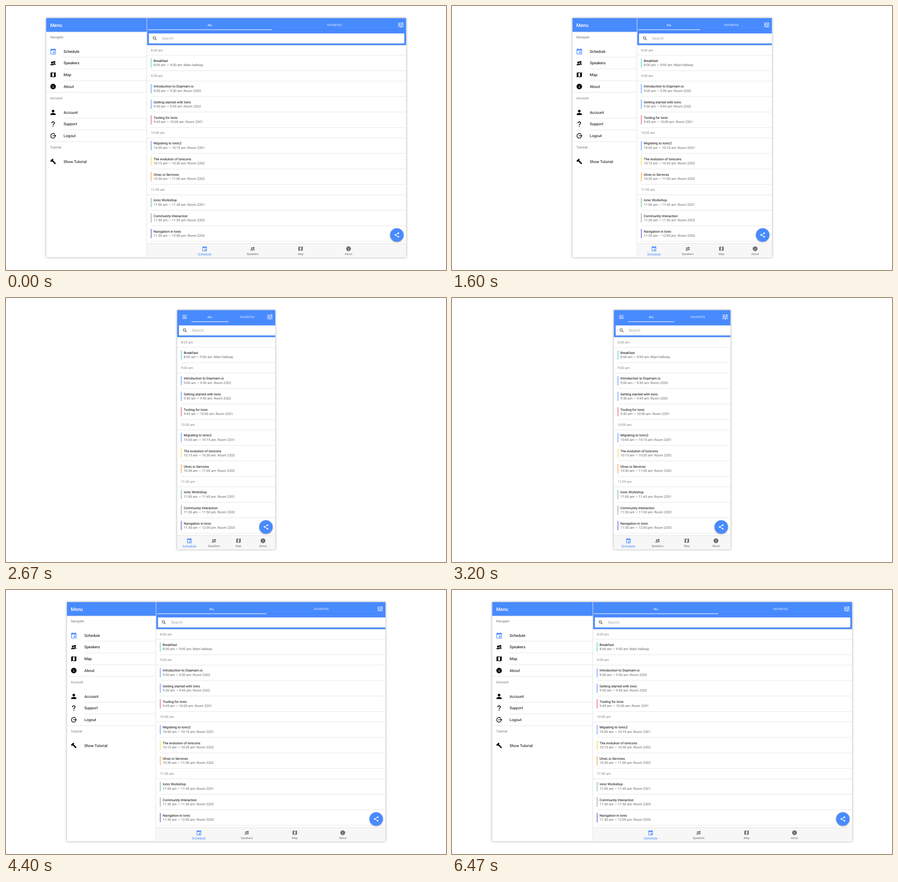
Animation of 966 by 580 pixels, one loop 6530 ms. Source, as an HTML page:

```html
<!DOCTYPE html>
<html lang="en">
<head>
<meta charset="utf-8">
<title>Responsive schedule</title>
<style>
  html, body { margin: 0; width: 100%; height: 100%; overflow: hidden; background: #fff; }
  #stage { display: block; width: 966px; height: 580px; }
  text { font-family: Roboto, sans-serif; text-rendering: geometricPrecision; white-space: pre; }
  .mid { text-anchor: middle; }
  .rule { stroke: #dedede; stroke-width: .8; }
  .blue { fill: #488aff; color: #488aff; }
  .line { fill: none; stroke: currentColor; }
  #frame { fill: #fff; filter: drop-shadow(0 .5px 2px rgba(0, 0, 0, .42)); }
  #fab { filter: drop-shadow(0 1px 1.6px rgba(0, 0, 0, .4)); }
  #field { width: calc(100% - 8.2px); filter: drop-shadow(0 .6px .6px rgba(0, 0, 0, .25)); }
</style>
</head>
<body>
<svg id="stage" viewBox="0 0 966 580"></svg>
<script>
const BLUE = '#488aff';
const TOP = 26.6, BOTTOM = 552.4, CENTER = 483.4;
const LOOP = 6530, STEP = 1000 / 15;
const SPLIT_MIN = 404, MENU_MIN = 142.2, TAB_MAX = 105.3;

// Icons on a 24-unit grid, centred on 12,12
const icons = {
  calendar: '<path fill-rule="evenodd" d="M16 2v2H8V2H6v2H5a2 2 0 0 0-2 2v14a2 2 0 0 0 2 2h14a2 2 0 0 0 2-2V6a2 2 0 0 0-2-2h-1V2zM5 9h14v11H5zM12 13h5v5h-5z"/>',
  people: '<circle cx="16.4" cy="8" r="4.3"/><path d="M11 18c1-4 3-5 5.500-5s6.500 2 6.500 5z"/>' +
    '<g stroke="#fff" stroke-width="1.100"><circle cx="8.200" cy="9.700" r="4.600"/><path d="M.3 20.500c0-4 4.500-6 8-6s8 2 8 6z"/></g>',
  map: '<path fill-rule="evenodd" d="M21 3l-6 2.100L9 3 3 5v16l6-2.100 6 2.100 6-2zM15 19l-6-2.100V5l6 2.100z"/>',
  info: '<path fill-rule="evenodd" d="M12 2a10 10 0 0 0 0 20 10 10 0 0 0 0-20zM11 7h2v2h-2zM11 11h2v6h-2z"/>',
  person: '<circle cx="12" cy="8" r="4"/><path d="M12 14c-2.700 0-8 1.300-8 4v2h16v-2c0-2.700-5.300-4-8-4z"/>',
  help: '<path class="line" stroke-width="2.800" d="M7 8.500C7 1.500 17 1.500 17 8c0 3.500-5 4-5 8"/><path d="M10.500 18.500h3v3h-3z"/>',
  logout: '<path class="line" stroke-width="2.200" d="M18.500 6.500a8.500 8.500 0 1 0 0 11M9 12h12M17.500 8.200L21.300 12l-3.800 3.800"/>',
  hammer: '<path d="M2 9.500L9.500 2 14 3.500 11.500 6l1.500 3 9 9.500-3 3-9.500-9-3-1L4.500 13z"/>',
  search: '<circle class="line" stroke-width="2.300" cx="9.500" cy="9.500" r="5.500"/><path class="line" stroke-width="2.500" d="M13.800 13.800l6 6"/>',
  share: '<path class="line" stroke-width="2" d="M18 5L6 12l12 7"/><circle cx="18" cy="5" r="3"/><circle cx="6" cy="12" r="3"/><circle cx="18" cy="19" r="3"/>',
  options: '<path class="line" stroke-width="2" d="M3 6h10M17 6h4M16 3v6M3 12h5M11 12h10M8 9v6M3 18h6M13 18h8M12 15v6"/>',
};

const icon = (name, x, y, scale, color = '#000') =>
  `<g fill="${color}" color="${color}" transform="translate(${x} ${y}) scale(${scale}) translate(-12 -12)">${icons[name]}</g>`;
const text = (str, x, y, size, color = '#000', extra = '') =>
  `<text x="${x}" y="${y + size * .36}" font-size="${size}" fill="${color}" ${extra}>${str}</text>`;
const rule = (x, y) => `<line class="rule" x1="${x}" x2="100%" y1="${y}" y2="${y}"/>`;
const bar = (y, height) => `<rect class="blue" y="${y}" width="100%" height="${height}"/>`;
const shade = y => `<rect y="${y}" width="100%" height="1" fill="#000" opacity=".15"/>`;

const SMALL = 6.32, BODY = 7.37, LABEL = 8.42, TITLE = 10.53;

function menuMarkup() {
  const groups = [
    ['Navigate', 68.6, [['calendar', 'Schedule', .65], ['people', 'Speakers', .56], ['map', 'Map', .63], ['info', 'About', .61]]],
    ['Account', 202.6, [['person', 'Account', .71], ['help', 'Support', .58], ['logout', 'Logout', .61]]],
    ['Tutorial', 310.7, [['hammer', 'Show Tutorial', .62]]],
  ];
  let out = bar(TOP, 30) + shade(56.6) + text('Menu', 8.7, 41.8, TITLE, '#fff', 'font-weight="500"');
  for (const [name, top, items] of groups) {
    out += text(name, 8.7, top, BODY, '#757575');
    items.forEach(([glyph, label, scale], i) => {
      const y = top + 31.1 + i * 25.75;
      const last = i === items.length - 1;
      out += icon(glyph, 15.2, y, scale, label === 'Schedule' ? BLUE : '#000') + text(label, 38.3, y, LABEL);
      if (name !== 'Tutorial') out += rule(last ? 0 : 38.3, y + 12.7);
    });
  }
  return out + `<rect x="100%" y="${TOP}" width="1" height="526" fill="#d4d4d4" transform="translate(-.9)"/>`;
}

function listMarkup() {
  const groups = [
    ['8:00 am', [['Breakfast', '8:00 am — 9:00 am: Main hallway', '#3bcfcb']]],
    ['9:00 am', [
      ['Introduction to Dopmarn.io', '9:00 am — 9:30 am: Room 2203', BLUE],
      ['Getting started with Ionic', '9:30 am — 9:45 am: Room 2202', BLUE],
      ['Tooling for Ionic', '9:45 am — 10:00 am: Room 2201', '#ee4b50']]],
    ['10:00 am', [
      ['Migrating to Ionic2', '10:00 am — 10:15 am: Room 2201', BLUE],
      ['The evolution of Ionicons', '10:15 am — 10:30 am: Room 2202', '#f2d335'],
      ['Ulvec.io Services', '10:30 am — 11:00 am: Room 2202', '#f29a35']]],
    ['11:00 am', [
      ['Ionic Workshop', '11:00 am — 11:45 am: Room 2201', '#5fb874'],
      ['Community Interaction', '11:30 am — 11:50 am: Room 2203', '#8e8d93'],
      ['Navigation in Ionic', '11:30 am — 12:00 pm: Room 2203', '#6e2cc4']]],
  ];
  let y = 85.8, out = '';
  for (const [time, talks] of groups) {
    out += text(time, 8.6, y + 11.3, BODY, '#858585') + rule(0, y + 22.4);
    y += 22.6;
    for (const [title, when, color] of talks) {
      out += `<rect x="8.5" y="${y + 6.4}" width="1.2" height="20.4" fill="${color}"/>` +
        text(title, 14.6, y + 11.7, BODY) + text(when, 14.6, y + 21.1, BODY, '#666') + rule(8.6, y + 33.7);
      y += 34.12;
    }
  }
  return out;
}

function pageMarkup() {
  const tabs = [['calendar', 'Schedule', .55], ['people', 'Speakers', .48], ['map', 'Map', .54], ['info', 'About', .53]];
  const tabMarkup = tabs.map(([glyph, label, scale], i) => {
    const color = i ? '#6c6c6c' : BLUE;
    return `<g class="tab">${icon(glyph, 0, 533.2, scale, color)}${text(label, 0, 545.2, i ? SMALL : BODY, color, 'class="mid"')}</g>`;
  }).join('');
  const field = '<rect id="field" x="4.100" y="60.200" height="22" rx="1" fill="#fff"/>';
  return listMarkup() + bar(TOP, 59.2) + shade(85.8) +
    '<path id="burger" stroke="#fff" stroke-width="1.100" d="M11.600 38.300h9.800M11.600 41.600h9.800M11.600 44.900h9.800"/>' +
    '<rect id="underline" y="51.500" height="1.100" fill="#fff"/>' +
    '<rect id="underline2" y="51.500" height="1" fill="#000" opacity=".08"/>' +
    text('ALL', 0, 41.3, SMALL, '#fff', 'id="all" class="mid" font-weight="500"') +
    text('FAVORITES', 0, 41.3, SMALL, '#fff', 'id="favorites" class="mid" font-weight="500" opacity=".7"') +
    field + icon('search', 17.4, 71.2, .49, '#5b5b5b') + text('Search', 32.6, 71.2, LABEL, '#a5a5a5') +
    `<rect y="521.800" width="100%" height="${BOTTOM - 521.8}" fill="#f7f7f7"/>` + rule(0, 521.8) + tabMarkup +
    '<svg x="100%" overflow="visible">' + icon('options', -11.8, 41.5, .66, '#fff') +
    '<circle id="fab" class="blue" cx="-20.500" cy="503" r="14.750"/>' + icon('share', -20.5, 503, .57, '#fff') + '</svg>';
}

const stage = document.getElementById('stage');
stage.innerHTML = `<rect id="frame" y="${TOP}" height="${BOTTOM - TOP}"/>` +
  `<svg id="menu" height="580">${menuMarkup()}</svg><svg id="page" height="580">${pageMarkup()}</svg>`;

const el = Object.fromEntries([...stage.querySelectorAll('[id]')].map(node => [node.id, node]));
const tabNodes = [...stage.querySelectorAll('.tab')];
const set = (node, attrs) => Object.entries(attrs).forEach(([key, value]) => node.setAttribute(key, value));

// Half the window width over time: [ms, px]
const keys = [
  [470, 395.2], [700, 370], [1130, 285.4], [1533, 219.2], [1800, 166.4], [2130, 128], [2470, 112],
  [2670, 107.8], [2850, 107.8], [3130, 119.5], [3400, 172], [3670, 228.8], [3800, 256.4], [4100, 308],
  [4400, 349.8], [4470, 357.4], [4730, 372], [5000, 384.5], [5130, 391.2], [5530, 395.2],
];
const secant = i => keys[i + 1] && keys[i] ? (keys[i + 1][1] - keys[i][1]) / (keys[i + 1][0] - keys[i][0]) : 0;
const slope = i => {
  const a = secant(i - 1), b = secant(i);
  return a * b > 0 ? 2 * a * b / (a + b) : 0;
};

function halfWidth(t) {
  const next = keys.findIndex(key => key[0] > t);
  if (next < 1) return keys[0][1];
  const i = next - 1, [t0, a] = keys[i], [t1, b] = keys[next];
  const d = t1 - t0, u = (t - t0) / d, v = 1 - u;
  return v * v * (1 + 2 * u) * a + u * u * (3 - 2 * u) * b + u * v * d * (v * slope(i) - u * slope(next));
}

function render(time) {
  let tick = Math.floor((time % LOOP + 4) / STEP);
  if (tick === 24) tick = 23; // resize stalls just before the menu collapses
  const half = halfWidth(tick * STEP), width = half * 2, left = CENTER - half;
  const split = width > SPLIT_MIN;
  const menuWidth = split ? Math.max(MENU_MIN, width * .28) : 0;
  const pageWidth = width - menuWidth;

  set(el.frame, { x: left, width });
  set(el.menu, { x: left, width: menuWidth, display: split ? 'inline' : 'none' });
  set(el.page, { x: left + menuWidth, width: pageWidth });
  set(el.burger, { display: split ? 'none' : 'inline' });

  const start = split ? 2 : 31.5, segment = (pageWidth - 21 - start) / 2;
  set(el.underline, { x: start, width: segment });
  set(el.underline2, { x: start + segment, width: segment });
  set(el.all, { x: start + segment / 2 });
  set(el.favorites, { x: start + segment * 1.5 });

  const gap = Math.min(TAB_MAX, pageWidth / 4);
  tabNodes.forEach((tab, i) => set(tab, { transform: `translate(${pageWidth / 2 + (i - 1.5) * gap} 0)` }));
}

const begin = performance.now();
function loop() {
  render(performance.now() - begin);
  requestAnimationFrame(loop);
}
loop();
</script>
</body>
</html>
```
